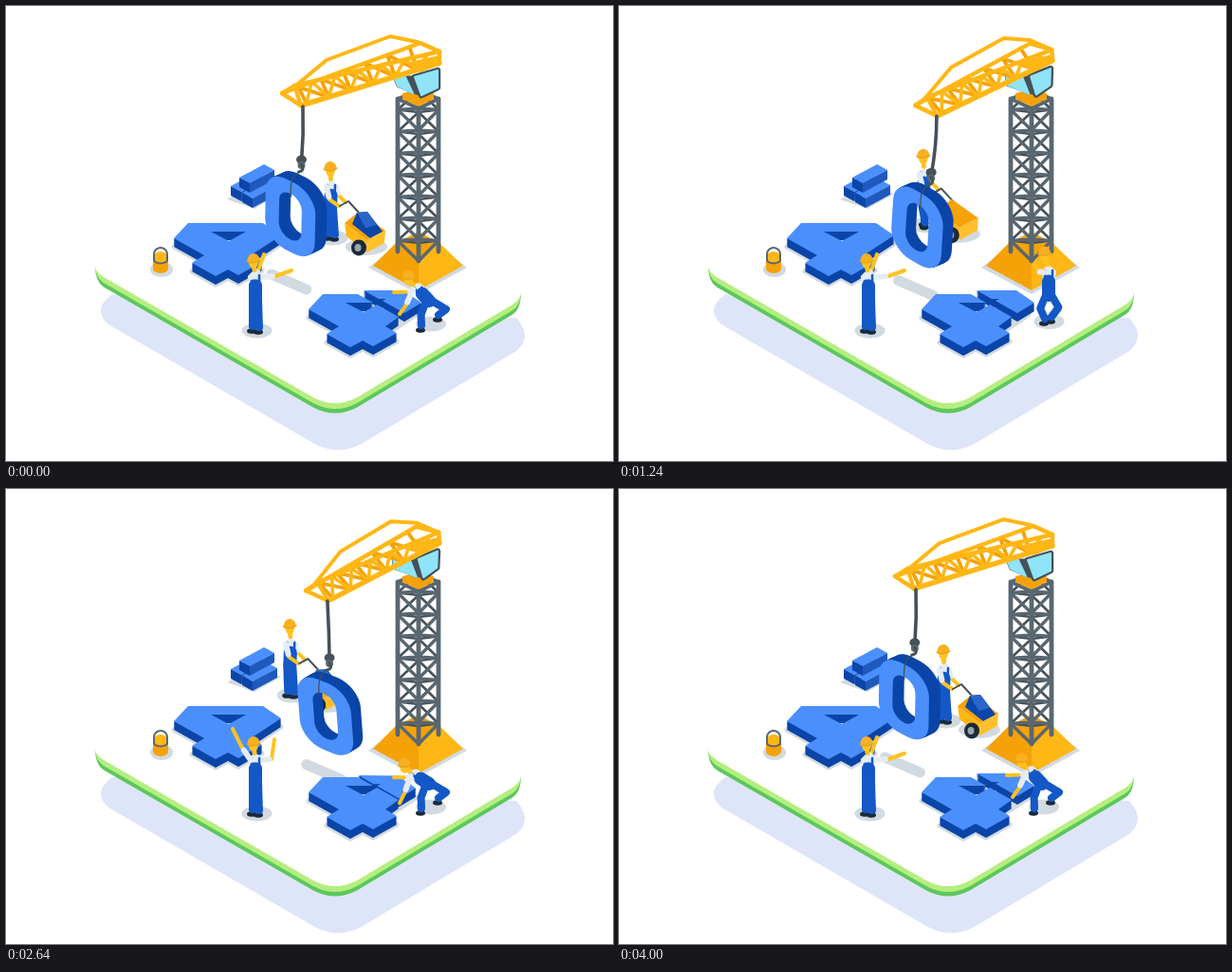
Recreate the animation shown at these times as an HTML page. Size 640 by 480 pixels, loop 4040 ms.

```html
<!DOCTYPE html>
<html lang="en">
<head>
<meta charset="utf-8">
<title>404 under construction</title>
<style>
html, body { margin: 0; width: 100%; height: 100%; overflow: hidden; background: #fff; }
svg { display: block; width: 100vw; height: 100vh; }
</style>
</head>
<body>
<svg viewBox="0 0 640 480" stroke-linecap="round" stroke-linejoin="round" fill="none">
  <g id="ground"></g>
  <g id="scene"></g>
</svg>
<script>
const LOOP = 4040, STEP = 40;
const C = {
  blue: '#4a8ffc', navy: '#0b45a8', denim: '#1358c6', gold: '#ffb715', amber: '#f5a209',
  skin: '#ffc220', shirt: '#e6ecf4', steel: '#596770', iron: '#465159', shade: '#d2dae1',
  glass: '#8fe4f8', shoe: '#1c2938'
};

const mix = (a, b, p) => a.map((v, i) => v + (b[i] - v) * p);
const range = n => [...Array(n).keys()];
const shift = (p, x, y = 0) => [p[0] + x, p[1] + y];
const polar = (p, length, degrees) =>
  shift(p, -length * Math.sin(degrees * Math.PI / 180), -length * Math.cos(degrees * Math.PI / 180));

// Eased progress between two times, and a plateau that rises and later falls.
const ease = (t, from, to) => {
  const u = Math.min(1, Math.max(0, (t - from) / (to - from)));
  return u * u * (3 - 2 * u);
};
const plateau = (t, rise, high, fall, low) => ease(t, rise, high) - ease(t, fall, low);

const move = (x, y, body, rot = 0) => `<g transform="translate(${x} ${y}) rotate(${rot})">${body}</g>`;
const poly = (pts, fill, extra = '') => `<polygon points="${pts}" fill="${fill}" ${extra}/>`;
const line = (pts, color, w) => `<polyline points="${pts}" stroke="${color}" stroke-width="${w}"/>`;
const path = (d, fill, extra = '') => `<path d="${d}" fill="${fill}" ${extra}/>`;
const curve = (d, color, w) => path(d, 'none', `stroke="${color}" stroke-width="${w}"`);
const dot = (x, y, rx, ry, fill) => `<ellipse cx="${x}" cy="${y}" rx="${rx}" ry="${ry}" fill="${fill}"/>`;
const toPath = pts => 'M' + pts.join('L') + 'Z';

function extrude(d, dx, dy, steps = 10) {
  const walls = range(steps).reverse().map(i => {
    const k = (i + 1) / steps;
    return path(d, C.navy, `fill-rule="evenodd" transform="translate(${dx * k} ${dy * k})"`);
  }).join('');
  return walls + path(d, C.blue, 'fill-rule="evenodd"');
}
const cast = d => path(d, C.shade, `stroke="${C.shade}" stroke-width="5" transform="translate(0 9)"`);

const fourTail = [[432, 317], [400, 338], [412, 345], [387, 359], [376, 353], [363, 360], [338, 346], [351, 338]];
const four = toPath([[319, 320], [334, 304], [413, 304], ...fourTail])
  + toPath([[358, 313], [395, 313], [377, 323]]);
const brokenFour = toPath([[319, 320], [334, 304], [371, 304], [387, 313], [358, 313], [377, 323],
  [391, 315], [414, 328], ...fourTail.slice(1)]);
const fragment = toPath([[371, 304], [413, 304], [432, 317], [414, 328], [391, 315], [395, 313], [387, 313]]);

const roundRect = (w, h, r) =>
  `M${-w} ${r - h}A${r} ${r} 0 0 1 ${r - w} ${-h}H${w - r}A${r} ${r} 0 0 1 ${w} ${r - h}`
  + `V${h - r}A${r} ${r} 0 0 1 ${w - r} ${h}H${r - w}A${r} ${r} 0 0 1 ${-w} ${h - r}Z`;
// The zero turns slightly towards the viewer as the jib swings.
const zero = turn => {
  const shape = roundRect(26.5 + turn, 37, 22) + roundRect(12, 24, 12), depth = 12 - 2 * turn;
  return `<g transform="skewY(26.5)">${extrude(shape, depth, -depth, 12)}</g>`;
};

function bar(x, y) {
  return move(x, y, poly([[0, 0], [26, -14], [37, -8], [11, 6]], C.blue)
    + poly([[0, 0], [11, 6], [11, 16], [0, 10]], C.navy)
    + poly([[11, 6], [37, -8], [37, 2], [11, 16]], '#1f59bd'));
}

function tower() {
  const post = (x, dy) => y => [x, y + dy];
  const left = post(413, 0), mid = post(435, 10), right = post(456, 0), back = post(435, -9);
  const zigzag = (a, b, color, w) =>
    line(range(15).map(i => (i % 2 ? a : b)(98 + i * 11.5)), color, w);
  return line([back(98), back(259)], C.iron, 3)
    + zigzag(left, back, C.iron, 2.6) + zigzag(right, back, C.iron, 2.6)
    + zigzag(left, mid, C.steel, 3.4) + zigzag(right, mid, C.steel, 3.4)
    + line([left, mid, right, back, left].map(f => f(98)), C.steel, 4)
    + [left, mid, right].map(f => line([f(98), f(259)], C.steel, 4.8)).join('');
}

function groundArt() {
  const slab = (y, color, peak) => path(`M94 275Q94 ${284 + y} 103 ${290 + y}L324 ${417 + y}`
    + `Q347 ${429 + y} 370 ${417 + y}L534 ${319 + y}Q543 ${313 + y} 543 302L320 ${peak}Z`, color);
  return path('M112 304Q90 320 108 336L322 460Q350 477 378 460L538 364Q556 349 538 329Z', '#dfe5f8')
    + slab(6.5, '#5cc75c', 300) + slab(2, '#b5ee80', 300) + slab(-4, '#fff', 140)
    + poly([[382, 276], [410, 254], [458, 254], [486, 276], [435, 304]], C.shade)
    + poly([[387, 274], [411, 250], [435, 264], [435, 300]], C.amber)
    + poly([[482, 274], [457, 250], [435, 264], [435, 300]], C.gold)
    + poly([[411, 250], [435, 238], [457, 250], [435, 266]], C.amber)
    + tower()
    + poly([[233, 204], [262, 188], [290, 198], [262, 214]], C.shade)
    + bar(237, 190) + bar(249, 197) + bar(246, 181)
    + dot(164, 278, 12, 8, C.shade)
    + path('M155 266V277A8 5 0 0 0 171 277V266Z', C.amber)
    + path('M155 267A8 8 0 0 1 171 267A8 4 0 0 1 155 267Z', C.gold)
    + curve('M156 268V262A7 7 0 0 1 170 262V268A7 3.5 0 0 1 156 268', C.steel, 2)
    + move(-142, -75, cast(four) + extrude(four, 0, 9));
}

function leg(hip, foot, side) {
  const reach = Math.hypot(foot[0] - hip[0], foot[1] - hip[1]);
  const bend = side * Math.sqrt(Math.max(0, 30 * 30 - reach * reach)) / 2;
  const knee = shift(mix(hip, foot, .5), bend);
  return dot(foot[0] - 1, foot[1] + 2, 5, 2.8, C.shoe)
    + line([hip, knee, shift(foot, 0, -3)], C.denim, 8);
}

function arm(shoulder, elbow, hand) {
  return line([shoulder, elbow, hand], C.skin, 4) + line([shoulder, mix(shoulder, elbow, .8)], C.shirt, 6);
}

function worker({ head, chest, hip, feet, elbows, hands }) {
  const waist = mix(chest, hip, .4);
  const strap = x => line([shift(chest, x, -2), shift(waist, x)], C.denim, 2.5);
  const middle = shift(mix(...feet, .5), 1, 1);
  return dot(...middle, 16, 8, C.shade)
    + arm(shift(chest, 5), elbows[1], hands[1])
    + leg(shift(hip, 3), feet[1], 1) + leg(shift(hip, -3), feet[0], -1)
    + line([chest, hip], C.shirt, 13) + line([waist, hip], C.denim, 14) + strap(-4) + strap(4)
    + arm(shift(chest, -5), elbows[0], hands[0])
    + line([head, mix(head, chest, .5)], C.skin, 5)
    + move(...head, dot(0, 0, 4.8, 6, C.skin)
      + path('M-6.5 -2A6.5 7.5 0 0 1 6.5 -3Q7 0 0 0Q-7 1 -6.5 -2Z', '#f7b021')
      + curve('M-7 -2Q0 2 7 -3', '#eba315', 1.3));
}

function carter(t) {
  const away = plateau(t, 520, 2040, 2400, 3880);
  const stride = 5 * Math.sin(Math.PI * away) * Math.sin(t / 120);
  const loaded = t > 2440 || t < 360;
  const load = poly([[365, 230], [370, 218], [381, 217], [397, 238], [384, 245]], C.navy)
    + poly([[370, 218], [381, 217], [391, 231], [379, 234]], '#2a65c9');
  const cart = dot(380, 254, 22, 9, C.shade)
    + line([[352, 211], [361, 206], [374, 220]], C.iron, 2)
    + poly([[357, 229], [372, 217], [400, 237], [380, 247]], C.amber)
    + (loaded ? load : '')
    + poly([[357, 229], [380, 247], [381, 260], [359, 243]], C.gold)
    + poly([[380, 247], [400, 237], [399, 250], [381, 260]], '#ffc02c')
    + dot(372, 255, 8, 8.5, C.shoe) + dot(371, 255, 3.5, 4, '#99a5ad');
  const body = worker({
    head: [342, 174], chest: [343, 191], hip: [342, 213],
    feet: [[340 - stride, 243 - stride / 2], [347 + stride, 244 + stride / 2]],
    elbows: [[341, 204], [350, 199]], hands: [[351, 211], [358, 207]]
  });
  return move(-46 * away, -29 * away, body + cart);
}

function signaller(t) {
  const raised = plateau(t, 1720, 2120, 3200, 3640);
  return worker({
    head: [261, 271], chest: [263, 286], hip: [263, 309], feet: [[260, 341], [267, 342]],
    elbows: [mix([266, 279], [249, 273], raised), mix([284, 285], [280, 285], raised)],
    hands: [mix([272, 262], [239, 253], raised), mix([301, 279], [283, 264], raised)]
  });
}

// Stoop is 0 when upright, 1 when crouching and more when leaning over the piece.
function fixer(t) {
  const upright = plateau(t, 0, 440, 1280, 1640), lean = plateau(t, 2240, 2960, 3280, 3920);
  const crouch = 1 - upright, stoop = crouch + .55 * lean;
  const hip = mix([453, 305], [446, 311], crouch);
  const chest = polar(hip, 24 - 7 * crouch, 44 * stoop);
  const head = polar(chest, 18 - 4 * crouch, 14 + 30 * stoop);
  const hands = [
    mix([438, 272], [415, 325 + 11 * lean], crouch),
    mix([456, 301], [409, 302 + 4 * lean], crouch)
  ];
  return worker({
    head, chest, hip, hands,
    feet: [mix([449, 333], [438, 340], crouch), mix([456, 331], [456, 329], crouch)],
    elbows: hands.map((hand, i) => shift(mix(chest, hand, .5), i ? 1 : -3, i ? 1 : 4))
  });
}

function rightFour(t) {
  const gap = 1 - plateau(t, 1800, 2760, 3440, 3960), lift = plateau(t, 1680, 2160, 2240, 2760);
  const joined = gap + lift < .1;
  const piece = move(6 * gap, -4 * gap - 11 * lift,
    `<g transform="rotate(${4 * lift} 400 315)">${extrude(fragment, 0, 9)}</g>`);
  return cast(four) + piece + extrude(brokenFour, 0, 9)
    + (joined ? path(fragment, C.blue) + line([[371, 304], [414, 328]], '#2d6cd6', .8) : '');
}

function crane(p) {
  const at = (ax, ay, bx, by) => mix([ax, ay], [bx, by], p);
  const far = [at(291, 92, 324, 112), at(437, 39, 431, 40)];
  const near = [at(311, 105, 349, 122), at(457, 60, 457, 56)];
  const top = [at(304, 84, 336, 103), at(457, 48, 456, 45)];
  const web = (a, b, color, w) =>
    line(range(12).map(i => mix(...(i % 2 ? a : b), (i + .5) / 12.5)), color, w);
  const sideGlass = [at(408, 72, 408, 71), at(421, 75, 428, 76), at(429, 92, 434, 93), at(413, 84, 408, 83)];
  const frontGlass = [at(431, 75, 436, 74), at(455, 68, 455, 65), at(455, 86, 454, 82), at(438, 94, 441, 93)];
  const pane = (pts, rim) => poly(pts, C.iron, `stroke="${C.iron}" stroke-width="${rim}"`)
    + poly(pts, C.glass, `stroke="${C.glass}" stroke-width="2"`);
  const neck = [at(421, 60, 421, 60), at(457, 52, 457, 50), at(457, 62, 457, 58), at(437, 70, 437, 69)];
  return poly([[418, 92], [435, 88], [451, 92], [451, 98], [435, 106], [418, 98]], C.amber)
    + poly([sideGlass[0], sideGlass[1], frontGlass[0], frontGlass[3], sideGlass[3]], C.iron,
      `stroke="${C.iron}" stroke-width="3"`)
    + pane(sideGlass, 2) + pane(frontGlass, 6.5)
    + line([mix(...far, .06), at(338, 57, 357, 69), at(405, 32, 406, 35), at(434, 38, 433, 35), top[1]], C.gold, 4)
    + web(far, near, C.amber, 3.8)
    + line(far, C.gold, 4.5)
    + web(top, near, C.gold, 3.6)
    + line(top, C.gold, 4.5) + poly(neck, C.gold) + line(near, C.gold, 5.5)
    + line([far[0], near[0]], C.gold, 4.5) + line([far[0], top[0], near[0]], C.gold, 4)
    + line([far[1], top[1], near[1]], C.gold, 4.5);
}

function draw(t) {
  const phase = 2 * Math.PI * t / LOOP, sway = Math.sin(phase), lag = Math.sin(phase + .3);
  const swing = (1 - Math.cos(phase - .07 * sway)) / 2;
  const [cx, cy] = mix([313, 106], [347, 122], swing);
  const hx = cx - 1.5 - 4.5 * sway, hy = 165 + 21 * swing;
  const zx = hx - 10 - 6 * lag, zy = hy + 57 - 2.2 * sway;

  const shadowY = 291 + 10 * swing;
  const cable = curve(`M${cx} ${cy}Q${cx + 1 - sway} ${(cy + hy) / 2} ${hx} ${hy}`, C.iron, 3.6);
  const hook = dot(0, -3, 5.5, 4.5, C.iron) + dot(0, 3, 4, 4, C.steel) + curve('M0 2Q4 9 -3 10', C.iron, 3);
  const sling = curve('M-2 10Q-13 14 -11 36', C.iron, 1.3);

  document.getElementById('scene').innerHTML =
    line([[zx - 20, shadowY - 8], [zx + 17, shadowY + 8]], C.shade, 11)
    + carter(t) + crane(swing) + cable
    + move(zx, zy, zero(swing), 4.5 * lag)
    + move(hx, hy, sling + hook)
    + signaller(t) + rightFour(t) + fixer(t);
}

document.getElementById('ground').innerHTML = groundArt();
const start = performance.now();
function tick() {
  const t = (performance.now() - start) % LOOP;
  draw(Math.floor(t / STEP) * STEP);
  requestAnimationFrame(tick);
}
tick();
</script>
</body>
</html>
```
